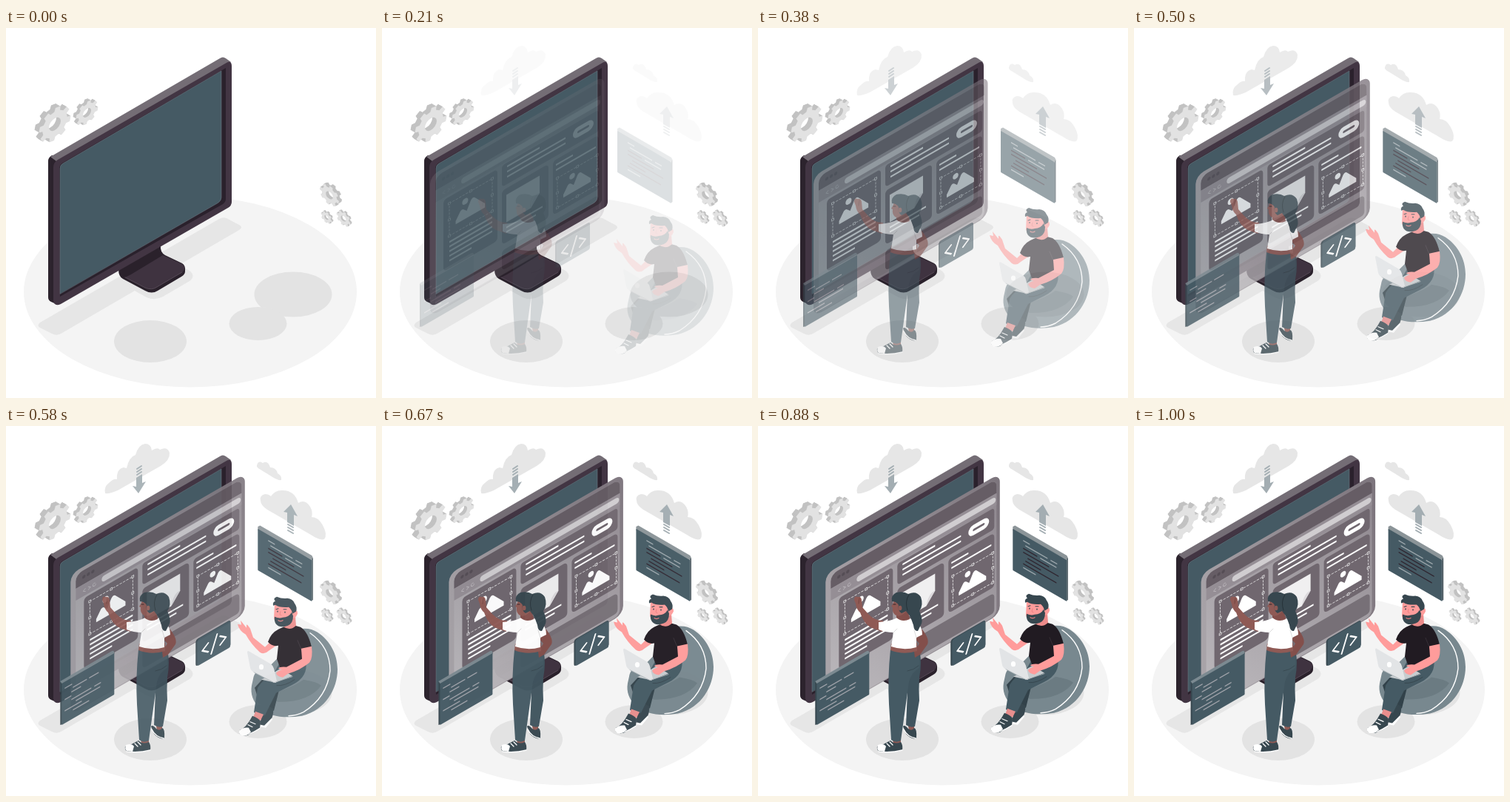
Recreate the animation shown at these times as an HTML page with a canvas. Size 500 px wide and 500 px high, loop 1040 ms.

```html
<!DOCTYPE html>
<html lang="en">
<head>
<meta charset="utf-8">
<title>Isometric web design</title>
<style>
html, body { margin: 0; width: 100%; height: 100%; overflow: hidden; background: #fff; }
canvas { display: block; width: 500px; height: 500px; }
</style>
</head>
<body>
<canvas id="stage"></canvas>
<script>
const SIZE = 500, LOOP = 1040, TILT = 0.577;
const dpr = window.devicePixelRatio || 1;
const SLATE = '#455a64', DARK = '#37474f', PALE = '#e6e6e6';
const BROWN = '#8f5a55', UMBER = '#834f4b', PINK = '#ff9c9b', CARD = '#70676f';

function makeContext(canvas) {
  canvas.width = canvas.height = SIZE * dpr;
  const c = canvas.getContext('2d');
  c.scale(dpr, dpr);
  return c;
}
const stage = makeContext(document.getElementById('stage'));
const base = makeContext(document.createElement('canvas'));
const layer = makeContext(document.createElement('canvas'));
let g = base;

function shape(color, d) {
  g.fillStyle = color;
  g.fill(new Path2D(d));
}
function line(color, width, d) {
  g.strokeStyle = color;
  g.lineWidth = width;
  g.lineCap = g.lineJoin = 'round';
  g.stroke(new Path2D(d));
}
function ellipse(color, x, y, rx, ry = rx) {
  g.fillStyle = color;
  g.beginPath();
  g.ellipse(x, y, rx, ry, 0, 0, 7);
  g.fill();
}
function box(color, x, y, w, h, r = 0) {
  g.fillStyle = color;
  g.beginPath();
  g.roundRect(x, y, w, h, r);
  g.fill();
}
// Draw on a vertical isometric plane whose origin is (x, y).
function plane(x, y, slope, draw) {
  g.save();
  g.transform(1, slope, 0, 1, x, y);
  draw();
  g.restore();
}

function gear(x, y, r, slope, teeth, depth) {
  const path = new Path2D();
  const step = Math.PI * 2 / teeth;
  for (let i = 0; i < teeth; i++) {
    for (const [a, k] of [[-.3, .78], [-.2, 1], [.2, 1], [.3, .78]]) {
      const t = (i + a) * step + .2;
      path.lineTo(Math.cos(t) * r * k, Math.sin(t) * r * k);
    }
  }
  path.closePath();
  path.moveTo(r * .37, 0);
  path.arc(0, 0, r * .37, 0, Math.PI * 2);
  const side = Math.sign(slope);
  for (let i = depth * 2; i >= 0; i--) {
    plane(x + side * i / 2, y - i * .29, slope, () => {
      g.fillStyle = i ? '#c2c2c2' : '#e2e2e2';
      g.fill(path, 'evenodd');
    });
  }
}

function floor() {
  ellipse('#f4f4f4', 249, 356.5, 225, 129);
  shape(PALE, 'M46 398L288 258Q293 255 298 257L315 266Q321 269 315 273L76 412Q69 417 62 413L46 405Q41 402 46 398Z');
  shape(PALE, 'M152 343L214 310L248 328Q257 335 248 342L212 363Q201 369 190 364Z');
  ellipse('#e3e3e3', 195, 423.5, 49, 28.5);
  ellipse('#e3e3e3', 388, 360, 52.5, 30.5);
  ellipse('#e3e3e3', 340.5, 399.5, 39, 22.5);
}

function monitor() {
  shape('#2a212b', 'M152 326L209 293Q208 303 215 307L238 318Q243 321 242 329Q242 333 237 336L205 355Q197 360 188 355L158 339Q152 336 152 326Z');
  shape('#3f3340', 'M169 333L212 307L238 319Q245 324 238 330L204 350Q197 355 188 351L161 337Z');
  line('#6a5f6b', .6, 'M161 337L188 351Q197 355 204 350L238 330');
  shape('#2c232d', 'M57 180Q57 175 62 172L73 177L70 374L61 370Q57 368 57 364Z');
  shape('#746d75', 'M60 174L289 41Q293 38 297 41L304 46L300 50L72 183Z');
  shape('#423543', 'M64 188Q64 182 70 178L298 47Q305 43 305 52V235Q305 240 300 243L74 373Q65 377 64 368Z');
  shape('#2a212c', 'M72 190Q72 185 77 182L292 57L297 54V231Q297 235 293 238L73 363Z');
  shape(SLATE, 'M73 190Q73 185 77 183L291 58V229Q291 233 287 236L73 359Z');
  line('#75808a', .5, 'M73 359V190Q73 185 77 183L291 58V229Q291 233 287 236Z');
}

function clouds() {
  shape(PALE, 'M134 91Q132 82 139 77Q145 71 150 72Q149 58 159 56Q163 57 163 57Q166 42 175 39Q179 25 188 24Q196 24 197 33Q205 28 208 32Q218 27 221 36Q222 46 209 54L151 87Q140 92 134 91Z');
  shape(PALE, 'M344 101Q342 94 350 92Q355 92 358 95Q364 86 374 87Q390 87 395 104Q404 98 411 109Q415 116 413 123Q422 123 428 134Q435 147 430 153Q424 155 412 147L353 113Q344 107 344 101Z');
  shape(PALE, 'M339 53Q341 46 347 50Q354 46 357 56Q365 56 367 64Q373 67 372 73Q367 74 357 67L344 59Q338 56 339 53Z');
  const gray = '#a3adb2';
  for (const y of [56, 60, 64]) line(gray, 2, `M177 ${y + 2}L183 ${y - 2}`);
  shape(gray, 'M176 70L184 65V77L189 75L179 91L171 81L176 82Z');
  shape(gray, 'M385 106L394 122L389 120V135L380 130V117L375 116Z');
  for (const y of [135, 139, 143]) line(gray, 2, `M381 ${y - 2}L388 ${y + 2}`);
}

function picture(x, y, w, h, s) {
  g.save();
  g.translate(x, y);
  g.lineWidth = .8;
  g.strokeStyle = '#eee';
  g.setLineDash([2.5, 2]);
  g.strokeRect(0, 0, w, h);
  g.setLineDash([]);
  for (const i of [0, 1, 2]) for (const j of [0, 1, 2]) {
    if (i === 1 && j === 1) continue;
    box(CARD, i * w / 2 - 2, j * h / 2 - 2, 4, 4);
    g.strokeRect(i * w / 2 - 1.4, j * h / 2 - 1.4, 2.8, 2.8);
  }
  g.scale(s, s);
  shape('#fff', 'M8 31V27L14 18Q16 16 18 18L22 22L27 12Q30 8 33 12L45 26V31Z');
  ellipse('#fff', 20, 9, 3.8);
  g.restore();
}

function browser() {
  plane(92, 200, -TILT, () => {
    const rim = g.createLinearGradient(0, 60, 235, 20);
    rim.addColorStop(0, '#a8a3a8');
    rim.addColorStop(1, '#7d757d');
    const body = g.createLinearGradient(20, 190, 220, 20);
    body.addColorStop(0, '#bcb9bd');
    body.addColorStop(1, '#908990');
    box(rim, 0, 0, 235.5, 190, 11);
    box(body, 7, 5, 224, 184, 8);
    box('#665d65', 7, 5, 224, 19, [9, 9, 0, 0]);
    for (const x of [18, 24, 30]) ellipse('#554d55', x, 14, 2.2);
    box('#958e95', 7, 24, 224, 16);
    box('#d0cdd0', 42, 28, 188, 8, 4);
    line('#b9b4b9', .9, 'M20 31L17 33L20 35M24 31L27 33L24 35');
    line('#b9b4b9', .9, 'M34 33A2 2 0 1 1 33 31');

    box(CARD, 97, 42, 131, 29, 4);
    for (const [y, w] of [[47, 44], [54, 79], [61, 79]]) box('#fff', 104, y - 1, w, 2.3);
    box('#fff', 193, 49, 28, 14, 7);
    box(CARD, 199, 54.5, 16, 3, 1.5);

    box(CARD, 18, 43, 73, 97, 5);
    picture(26, 52, 58, 44, 1.07);
    for (let i = 0; i < 5; i++) box('#fff', 26, 103 + i * 6.3, i === 4 ? 30 : 58, 2.4);

    box(CARD, 97, 76, 63, 73, 5);
    shape('#f0eff0', 'M103 85H148V108L136 122H103Z');
    shape('#dcd9dc', 'M148 108Q139 106 136 122Z');
    for (const y of [128, 134]) box('#fff', 103, y, y === 128 ? 49 : 40, 2.3);

    box(CARD, 166, 76, 62, 73, 5);
    box('#fff', 170, 82, 23, 2.3);
    box('#fff', 170, 89, 54, 2.3);
    picture(172, 102, 54, 40, 1);

    box('#777077', 97, 157, 131, 27, 5);
  });
}

function codeLeft() {
  shape(DARK, 'M78 346L80 345L151 305V308L81 349V403L78 404Z');
  plane(80, 347, -TILT, () => {
    box(SLATE, 0, 0, 71, 57, 1);
    const rows = [[4, 14], [15, 34], [13, 26], [4, 13], [13, 40], [19, 52], [4, 27], [15, 37]];
    rows.forEach(([a, b], i) => box('#a0a3aa', a, 9 + i * 5.1, b - a, 1.5));
    box('#a0a3aa', 37, 14.1, 13, 1.5);
    box('#a0a3aa', 44, 29.4, 9, 1.5);
  });
  shape('#7c8a91', 'M78 345L148 304Q151 303 151 307L80 348Z');
}

function codeRight() {
  shape('#8b9498', 'M345 136L348 134.5L418 175L419.5 178L418 181L345 141Z');
  plane(345, 138, TILT, () => {
    box(SLATE, 0, 1, 73, 56, 1);
    const rows = [[14, 23], [17, 47], [14, 33], [14, 49], [20, 62], [17, 38], [14, 59], [14, 31]];
    rows.forEach(([a, b], i) => box(i > 1 && i < 7 ? '#2f2630' : '#9da8ad', a, 8 + i * 5.2, b - a, 1.5));
    box('#9da8ad', 51, 13.2, 9, 1.5);
    box('#9da8ad', 37, 18.4, 22, 1.5);
  });
  shape(DARK, 'M418 180L419.5 178V235L418 236Z');
}

function codeIcon() {
  plane(261, 289, -TILT, () => {
    box(DARK, 0, 0, 47, 36, 3);
    box(SLATE, 2, 1, 45, 36, 3);
    line('#fff', 2.1, 'M17 14L9 20L17 26M33 14L41 20L33 26M29 9L21 31');
  });
}

function beanbag() {
  shape('#78888f', 'M334 337Q336 323 352 324L370 306C378 266 405 264 421 274C438 285 448 304 448 324C448 350 432 379 400 387Q363 393 343 377Q329 363 332 346Z');
  shape('#6b7b82', 'M351 359Q385 350 402 338Q421 341 426 346Q409 369 367 368Z');
  line('#fff', 1.4, 'M411 275Q438 294 438 326Q434 362 402 382Q392 387 382 387');
}

function man() {
  beanbag();
  // far leg and shoe
  shape('#32424a', 'M374 320L347 337L336 349L344 374L348 379L362 380L371 344Z');
  shape(DARK, 'M347 383Q353 379 354 373L361 377Q362 387 357 394L350 402Q343 402 343 397Z');
  shape('#fff', 'M344 399L349 400L359 390L360 392L351 403L344 402Z');
  // near leg and shoe
  shape(SLATE, 'M405 313Q409 334 387 345L365 356L350 386Q342 389 335 382L340 349Q347 337 360 333L371 313Z');
  line(DARK, 1, 'M390 338Q377 347 366 346');
  shape('#e88e8d', 'M337 381L348 385L344 393L334 389Z');
  shape(DARK, 'M316 406Q324 404 333 387Q341 390 344 394L343 403Q335 408 327 413Q318 415 315 410Z');
  shape('#fff', 'M315 407Q321 402 328 403L331 409L325 413Q317 415 315 410Z');
  line('#fff', 1.2, 'M318 413Q327 414 343 404M327 399L333 402M330 395L337 398');
  // raised arm
  shape(PINK, 'M366 278L350 294L334 281L330 269Q326 263 325 264L325 268L317 258L318 264L313 263Q315 272 324 277Q331 290 343 301Q349 305 355 299L371 288Z');
  // torso
  shape('#211b22', 'M368 270L379 265Q390 264 398 267Q408 273 413 294Q406 299 399 297L405 319Q390 327 370 321L366 310L368 292Q360 294 354 287Q358 275 368 270Z');
  line('#3b343c', .8, 'M399 297L394 285');
  // laptop
  shape('#c7cccf', 'M345 338L371 323L387 333L364 342Z');
  shape('#e2e4e6', 'M326 301Q326 298 329 300L358 317Q361 319 362 323L366 340Q365 343 362 342L335 328Q331 326 330 322Z');
  line('#aeb5b9', .8, 'M335 328L362 342L387 334');
  ellipse('#fff', 345, 321, 3.1, 3.6);
  // resting arm
  shape(PINK, 'M399 296L413 293Q415 309 410 315Q398 325 381 330L374 335Q366 334 365 329Q369 325 373 325L368 323Q370 320 379 321L400 310Z');
  // head
  shape('#ed8b8a', 'M374 257L391 253L392 265Q384 273 374 266Z');
  shape(PINK, 'M363 235L386 237L389 246Q394 242 394 249Q391 256 387 255Q386 267 374 266Q365 264 362 255Z');
  shape(DARK, 'M361 238Q360 233 364 232Q360 228 366 226Q373 229 380 228Q388 229 390 235Q394 240 392 246L387 249Q386 243 382 240Q370 241 364 237Z');
  shape(DARK, 'M363 253Q369 256 374 254Q382 254 386 247L388 252Q388 262 381 265Q370 269 365 263Q362 259 363 253Z');
  line('#e87f80', 1.2, 'M368 258Q371 260 374 258');
  line(DARK, 1.1, 'M365 243L368 242M375 243L379 243');
  ellipse(DARK, 367, 246, .8, 1.1);
  ellipse(DARK, 377, 247, .8, 1.1);
  line('#e87f80', .9, 'M371 246L370 250L372 251');
}

function woman() {
  // shoes and ankles
  shape(BROWN, 'M182 421L193 421L193 430L183 431ZM202 400L211 400L211 411L204 411Z');
  shape(DARK, 'M196 406Q198 403 203 409Q208 413 211 408Q215 409 214 422Q207 424 200 416Z');
  line('#fff', 1.4, 'M197 410Q202 420 213 422');
  shape(DARK, 'M161 433Q171 430 179 425Q185 431 193 427Q196 431 195 438Q182 442 164 440Q160 438 161 433Z');
  shape('#fff', 'M162 431Q170 428 173 433L171 440L163 439Q160 436 162 431Z');
  line('#fff', 1.3, 'M163 440Q180 442 195 438M174 429L178 433M178 427L182 431');
  // trousers
  shape('#40545e', 'M196 305L218 304Q222 318 218 340Q217 356 218 371L212 406Q206 408 200 404L202 359Z');
  shape(SLATE, 'M179 302Q197 309 215 303Q220 314 218 327Q207 333 204 346L193 425Q186 429 180 424L177 376Q175 340 179 302Z');
  line(DARK, .8, 'M217 324Q210 330 202 331');
  // bent arm
  shape(UMBER, 'M213 272L222 275Q232 288 229 295L219 309L212 313L211 305L218 294L211 286Z');
  // waist
  shape(BROWN, 'M180 294L215 293L215 304Q197 310 179 303Z');
  // raised arm
  shape(BROWN, 'M169 263Q157 263 149 254L141 245L140 235Q139 230 135 231Q130 229 130 235L132 240Q133 248 138 252Q143 268 154 273L168 278Z');
  line('#6e403c', .8, 'M137 233L136 240');
  // top
  shape('#fff', 'M163 265Q180 264 190 258Q205 258 214 264Q222 271 222 282L214 286L214 299Q197 304 180 298L183 279Q172 279 163 275Z');
  line('#dcdcdc', 1, 'M183 279L188 274M214 286L211 276');
  // head and hair
  shape(UMBER, 'M187 250L202 245L205 261Q195 266 187 259Z');
  shape(BROWN, 'M184 231L198 232L201 250Q192 260 185 255Q181 251 182 245L180 244L183 239Z');
  shape(DARK, 'M181 237Q179 229 187 225Q197 223 203 227Q214 222 220 231Q224 242 218 250Q223 261 221 267L216 277Q211 278 210 269L206 258L200 250L194 253Q188 249 190 242Q187 237 181 237Z');
  line('#263238', 1, 'M204 228Q198 237 202 249');
  ellipse(BROWN, 192, 246, 2.4, 3.2);
  line('#2c1f22', .9, 'M183 241L186 241');
}

// [step, value] keys; the panels slide right and the man slides up.
const fade = [[2, 0], [5, .18], [9, .55], [12, .78], [14, .9], [17, 1]];
const slide = [[2, 34], [5, 27], [9, 17], [12, 8.7], [14, 4.7], [16, 1.6], [18, 0], [24, 1.4]];

function at(keys, k) {
  if (k <= keys[0][0]) return keys[0][1];
  for (let i = 1; i < keys.length; i++) {
    const [a, va] = keys[i - 1], [b, vb] = keys[i];
    if (k <= b) return va + (vb - va) * (k - a) / (b - a);
  }
  return keys[keys.length - 1][1];
}

// Compose each group before applying its opacity.
function group(draw, alpha, dx = 0, dy = 0) {
  g = layer;
  g.clearRect(0, 0, SIZE, SIZE);
  g.save();
  g.translate(dx, dy);
  draw();
  g.restore();
  stage.globalAlpha = alpha;
  stage.drawImage(layer.canvas, 0, 0, SIZE, SIZE);
  stage.globalAlpha = 1;
}

function render(k) {
  const alpha = at(fade, k), shift = at(slide, k);
  stage.fillStyle = '#fff';
  stage.fillRect(0, 0, SIZE, SIZE);
  if (alpha) group(clouds, alpha);
  stage.drawImage(base.canvas, 0, 0, SIZE, SIZE);
  if (!alpha) return;
  for (const part of [browser, codeLeft, codeRight, codeIcon]) group(part, alpha, -shift);
  group(man, alpha, 0, shift);
  group(woman, alpha);
}

floor();
gear(66, 130, 21.5, -TILT, 8, 6);
gear(109.5, 114.5, 15, -TILT, 8, 4);
gear(437, 226, 13, TILT, 8, 4);
gear(433, 256, 7.5, TILT, 8, 2);
gear(456, 257.5, 9.5, TILT, 8, 2);
monitor();

let shown = -1;
const start = performance.now();
function tick() {
  // 24 steps per second
  const time = (performance.now() - start) % LOOP;
  const k = Math.min(24, Math.floor(time * .024 + .1));
  if (k !== shown) render(shown = k);
  requestAnimationFrame(tick);
}
tick();
</script>
</body>
</html>
```
